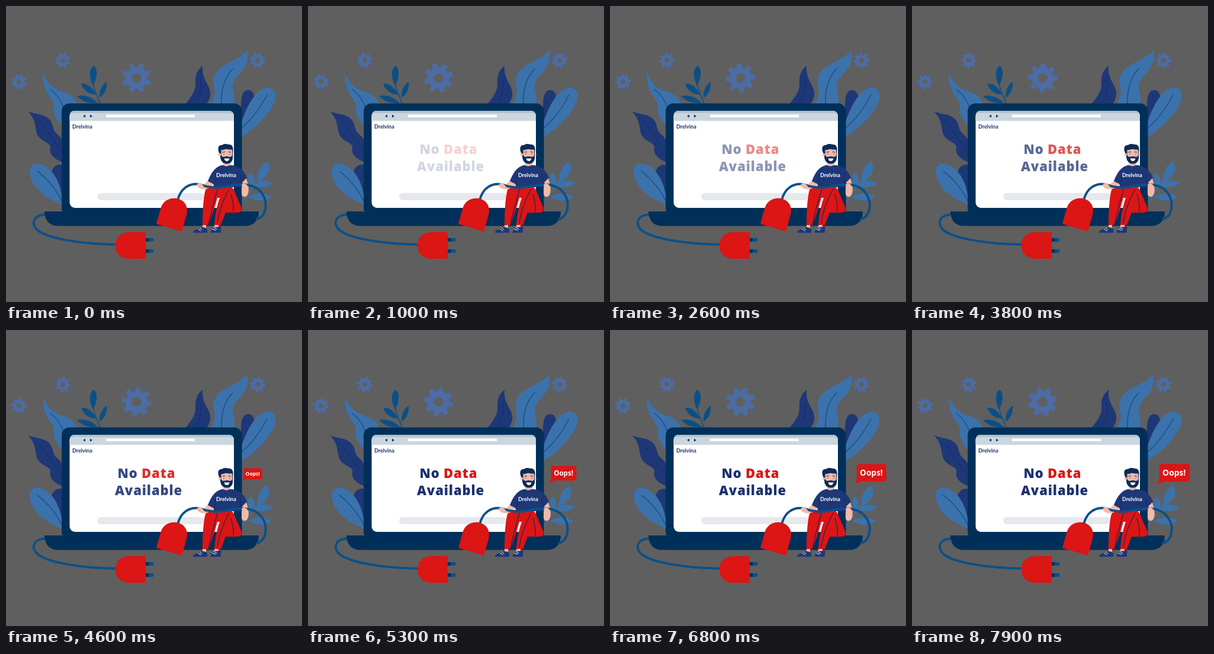
Write an HTML page that moves like this. It is 500 by 500 pixels and loops after 8000 ms.

```html
<!DOCTYPE html>
<html lang="en">
<head>
<meta charset="utf-8">
<title>No data available</title>
<style>
  html, body { margin: 0; width: 100%; height: 100%; overflow: hidden; background: #5f5f5f; }
  svg { display: block; width: 100%; height: 100%; }
  .headline { font: 800 22px "Open Sans", "Noto Sans", sans-serif; letter-spacing: 0.9px; }
  .brand { font: 700 9px Lato, sans-serif; }
  .oops { font: 700 14px "Open Sans", "Noto Sans", sans-serif; }
  .light { fill: #3c72ab; }
  .indigo { fill: #1d3777; }
  .teal { fill: #0b4f88; }
  .navy { fill: #00305a; }
  .red { fill: #dc1515; }
  .skin { fill: #f4b9a7; }
  .hair { fill: #0b2b59; }
  .line { fill: none; stroke-linecap: round; stroke-linejoin: round; }
  .vein { stroke: #15508c; stroke-width: 1.5; }
  .fold { stroke: #14275a; stroke-width: 1.1; }
  .cable { stroke: #0b5088; stroke-width: 4; }
</style>
</head>
<body>
<svg viewBox="0 0 500 500">
  <rect width="500" height="500" fill="#5f5f5f"/>
  <g id="gears" fill="#4c6ca5" fill-rule="evenodd"></g>

  <!-- left foliage -->
  <path class="light" d="M62 111C67 128 79 140 93 144C107 147 116 154 121 167L96 203C84 192 79 181 81 169C83 157 61 151 62 111Z"/>
  <path class="line vein" d="M75 141C85 148 93 159 98 174"/>
  <path class="indigo" d="M37 178C49 183 60 182 69 188C80 195 78 206 83 213C88 219 94 220 96 233V264C82 259 72 250 75 239C76 231 61 230 54 219C48 208 53 194 37 178Z"/>
  <path class="line" stroke="#142c66" d="M57 194C66 206 75 221 95 246"/>
  <path class="indigo" d="M96 269C84 265 75 275 76 291C78 309 86 323 96 330Z"/>
  <path class="light" d="M40 281C39 264 56 263 70 273C86 286 94 306 96 336C70 326 43 309 40 281Z"/>
  <path class="line vein" d="M53 279C71 293 84 308 95 331"/>
  <g class="teal">
    <path d="M148 101C156 106 154 123 147 134C140 122 140 106 148 101Z"/>
    <path d="M127 131C138 130 148 139 152 150C140 149 130 142 127 131Z"/>
    <path d="M170 128C171 140 167 149 158 155C157 143 162 133 170 128Z"/>
    <path d="M120 152C133 149 146 154 155 164C141 165 129 162 120 152Z"/>
  </g>
  <path class="line" stroke="#0b4f88" stroke-width="1.6" d="M147 130C149 145 155 151 159 166"/>

  <!-- right foliage -->
  <path class="indigo" d="M332 101C323 108 319 118 320 130C321 144 312 154 302 167H338C347 155 347 145 341 134C335 123 331 115 332 101Z"/>
  <path class="line" stroke="#142c66" d="M328 124C333 139 327 153 319 165"/>
  <path class="light" d="M408 75C393 92 364 97 354 114C345 130 357 141 351 154L346 167H384C387 160 387 153 384 145C381 134 384 125 393 116C403 106 410 95 408 75Z"/>
  <path class="line vein" d="M383 106C370 119 363 138 364 166"/>
  <path class="indigo" d="M408 142C420 141 422 158 417 173C412 185 405 192 397 198V166C397 153 400 143 408 142Z"/>
  <path class="light" d="M442 138C457 138 460 154 449 171C438 190 419 208 397 222V198C405 175 420 139 442 138Z"/>
  <path class="line vein" d="M441 150C430 171 416 191 398 206"/>
  <g class="light">
    <path d="M441 263C449 273 444 288 425 299C423 282 428 270 441 263Z"/>
    <path d="M412 281C421 286 422 297 416 308C408 300 407 289 412 281Z"/>
    <path d="M452 299C443 307 430 308 418 303C428 294 441 293 452 299Z"/>
    <path d="M448 322C437 332 421 330 409 322C421 315 436 315 448 322Z"/>
  </g>
  <path class="line" stroke="#3c72ab" stroke-width="1.6" d="M433 281C420 302 408 318 397 334"/>

  <!-- laptop -->
  <path class="line cable" d="M69 352C49 352 42 364 50 375C63 393 128 402 187 403"/>
  <rect class="navy" x="94" y="164.500" width="304.500" height="190" rx="13"/>
  <path class="navy" d="M65 347H427C427 362 418 371.500 405 371.500H87C74 371.500 65 362 65 347Z"/>
  <rect x="107.500" y="177" width="277.500" height="164" rx="9" fill="#fff"/>
  <path fill="#cbd6df" d="M107.500 194V186Q107.500 177 116 177H376Q385 177 385 186V194Z"/>
  <path fill="#aebfcb" d="M108 183Q110 177 116 177H376Q382 177 384 183Q382 180.500 376 180.500H116Q110 180.500 108 183Z"/>
  <path class="navy" d="M134 183.500V188.500L130 186ZM142 183.500V188.500L146 186Z"/>
  <rect x="169" y="183.500" width="150" height="4.500" rx="1" fill="#fff"/>
  <rect x="154" y="316" width="181" height="12" rx="6" fill="#e5e8ec"/>
  <text class="brand" x="112" y="206.500" fill="#1b3270">Drelvina</text>
  <g id="headline" class="headline" fill="#1b3070">
    <text x="188.500" y="249.500">No</text>
    <text x="229" y="249.500" fill="#dc1515">Data</text>
    <text x="184" y="279">Available</text>
  </g>

  <!-- plugs -->
  <path class="teal" d="M236 392H247Q249.500 392 249.500 395T247 398H236ZM236 411H247Q249.500 411 249.500 414T247 417H236Z"/>
  <path class="navy" d="M236 392H241V398H236ZM236 411H241V417H236Z"/>
  <path class="red" d="M236 382H209C194 382 185 391 185 404.500S194 427 209 427H236Z"/>
  <path class="line cable" d="M290 328C295 308 309 299 326 301"/>
  <path class="red" d="M254 368L297 381L305 353C309 338 301 328 289 325C275 323 264 330 261 343Z"/>

  <!-- man: legs -->
  <path class="skin" d="M333 366H338V376H331ZM353 366H359V376H351Z"/>
  <path class="red" d="M344 304H372L366 322L357 324C353 340 347 356 342 370H332C332 350 333 329 336 314Q338 306 344 304Z"/>
  <path class="red" d="M357 324C361 313 367 305 375 304Q382 304 385 311L397 339Q400 349 390 349H371L363 370H352C353 354 356 338 361 324Z"/>
  <path class="line fold" d="M357 310C352 328 346 350 342 369M377 309C367 327 359 349 357 367M380 318C383 328 385 338 384 347"/>
  <path class="indigo" d="M331 373C336 375 339 374 340 378V383H316Q315 379 322 377.500Q328 377 331 373ZM351 373C356 375 361 371 364 374Q362 378 363 383H346Q345 379 349 377Z"/>
  <path class="line" stroke="#fff" d="M325 377L329 380M328 375L331 378M349 377L354 379M351 374L356 377"/>

  <!-- man: torso and arms -->
  <path class="skin" d="M343 293L353 299C347 307 338 311 330 309C325 308 321 304 323 300C326 297 332 301 335 301ZM398 292L405 289C409 299 412 311 408 319C404 325 398 322 398 317Z"/>
  <path class="indigo" d="M364 269H382C394 271 402 277 407 290L399 298L400 306H351L351 301L341 296C345 285 351 273 364 269Z"/>
  <path class="line" stroke="#142b60" d="M353 286C355 293 352 298 351 302M396 285V298"/>

  <!-- man: head -->
  <path class="skin" d="M367 260H379V268Q373 273 367 269Z"/>
  <path class="hair" d="M360 248C357 241 358 234 365 235C369 231 375 234 378 234C384 235 384 241 383 248V254C384 262 379 266.500 373 266.500S362 262 362 254Z"/>
  <path class="skin" d="M363.500 243C367 244 370 241 374 242C378 243 380 242 382 243L382 252Q381 255 378 255Q373 253 368 255Q365 255 363.500 252Z"/>
  <circle class="skin" cx="361" cy="251" r="2.300"/>
  <circle class="skin" cx="384" cy="251" r="1.700"/>
  <path class="line" stroke="#0b2b59" stroke-width="1" d="M366 247L369.500 246.500M376 246.500L379.500 247M368 250V250.500M378 250V250.500"/>
  <path fill="#fff" d="M368.500 257.500H377.500Q376.500 262 373 262T368.500 257.500Z"/>

  <text class="brand" x="355" y="289" fill="#fff">Drelvina</text>
  <path class="line cable" d="M325 301C343 307 358 309 376 304C391 301 409 300 420 306C436 314 442 332 437 347C434 356 428 359 424 360"/>
  <path class="skin" d="M323 301Q326 297 331 301L335 306Q331 310 326 307ZM398 302Q402 297 407 302L409 309L400 312Z"/>

  <g id="bubble">
    <path class="red" d="M422 226H466Q469.500 226 469.500 230V252Q469.500 256 465.500 256H425L415 261L418 252V230Q418 226 422 226Z"/>
    <text class="oops" x="423.500" y="246" fill="#fff">Oops!</text>
  </g>
</svg>
<script>
  const LOOP = 8000;
  const FADE_END = 5200;
  const BUBBLE_START = 3800;
  const GEAR_SPEED = 6.6; // degrees per second
  const byId = id => document.getElementById(id);

  // Eight tapered teeth around a ring with a round hole.
  function gearPath(radius) {
    const root = radius * 0.74, hole = radius * 0.32;
    const at = (r, deg) => {
      const a = deg * Math.PI / 180;
      return `${(r * Math.cos(a)).toFixed(2)} ${(r * Math.sin(a)).toFixed(2)}`;
    };
    const points = [];
    for (let deg = 0; deg < 360; deg += 45) {
      points.push(at(root, deg - 13), at(radius, deg - 9), at(radius, deg + 9), at(root, deg + 13));
    }
    return `M${points.join('L')}ZM${hole} 0A${hole} ${hole} 0 1 1 ${-hole} 0A${hole} ${hole} 0 1 1 ${hole} 0Z`;
  }

  const gears = [[22, 128, 13.3], [96, 92, 13.3], [425, 92, 13.3], [220.5, 121.5, 25]].map(([x, y, r]) => {
    const node = document.createElementNS('http://www.w3.org/2000/svg', 'path');
    node.setAttribute('d', gearPath(r));
    byId('gears').append(node);
    return { node, x, y };
  });

  function draw(t) {
    const angle = 22 + GEAR_SPEED * t / 1000;
    for (const { node, x, y } of gears) {
      node.setAttribute('transform', `translate(${x} ${y}) rotate(${angle})`);
    }
    byId('headline').setAttribute('opacity', Math.min(1, t / FADE_END));

    // The bubble swells out of the man's mouth and settles slowly.
    const scale = t > BUBBLE_START ? 1 - Math.exp((BUBBLE_START - t) / 850) : 0;
    byId('bubble').setAttribute('transform', `translate(375 246) scale(${scale}) translate(-375 -246)`);
  }

  const start = performance.now();
  function tick() {
    draw((performance.now() - start) % LOOP);
    requestAnimationFrame(tick);
  }
  tick();
</script>
</body>
</html>
```
